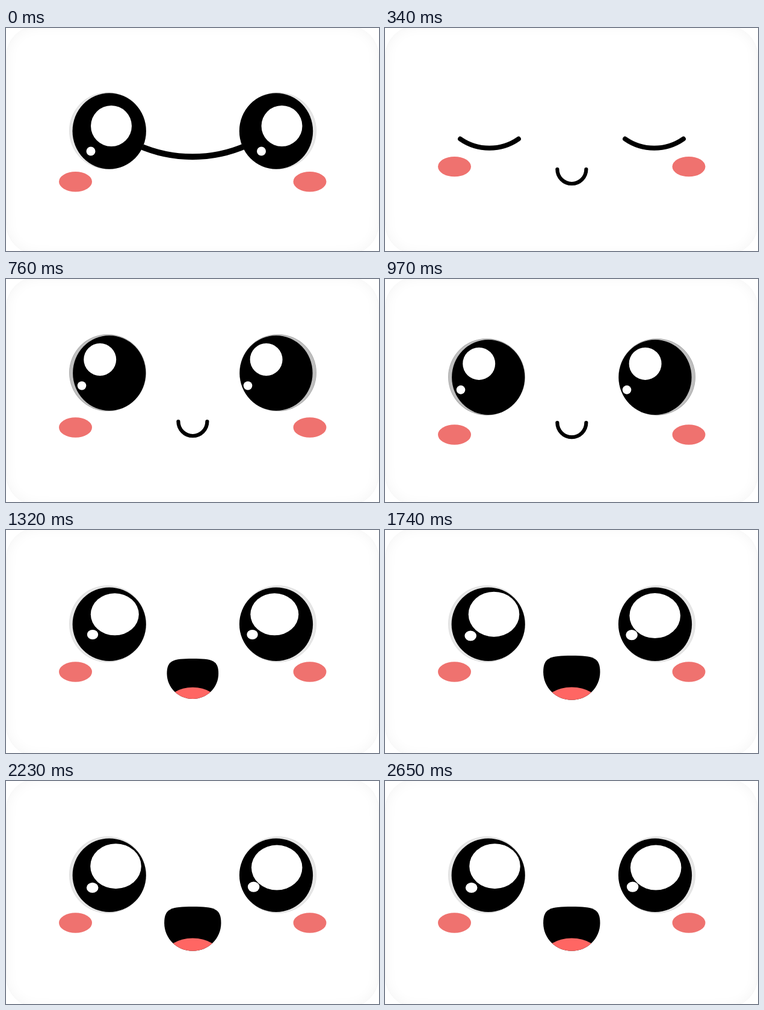
These frames come from a looping animation (620x371 px, 2720 ms). An HTML page with a canvas:

```html
<!DOCTYPE html>
<html lang="en">
<head>
<meta charset="utf-8">
<title>Happy face</title>
<style>
  html, body { margin: 0; width: 100%; height: 100%; overflow: hidden; background: #fff; }
  .stage { position: relative; width: 100%; height: 100%; overflow: hidden; contain: paint; }
  .card {
    position: absolute; left: 0; top: -4px; width: 620px; height: 381px;
    box-sizing: border-box; border: 1px solid #f6f6f6; border-radius: 52px;
    background: #fff; box-shadow: inset 0 0 22px rgba(0, 0, 0, .045);
  }
  canvas { position: absolute; left: 0; top: 0; display: block; }
</style>
</head>
<body>
<div class="stage">
  <div class="card"></div>
  <canvas id="face" width="620" height="371"></canvas>
</div>
<script>
const LOOP = 2720, STEP = 70, OFFSET = 60;
const ctx = document.getElementById('face').getContext('2d');
const LIGHT = ['#e7e7e7', '#dcdcdc'], DARK = ['#bfbfbf', '#a6a6a6'];

// Highlights: [left x, left y, right x, right y, radius x, radius y]
const CALM = { big: [175, 163, 458.5, 163, 34, 34], dot: [141, 205, 424.5, 205, 7.5, 7.5] };
const SIDE = { big: [156.2, 134, 432.6, 134, 27, 27], dot: [126, 177.5, 402, 177.5, 7.3, 7.3] };
const GLAD = { big: [180.8, 140.3, 446.3, 140.3, 40, 35], dot: [144, 174, 409.5, 174, 9.2, 8] };
const JOY = { big: [181, 140.2, 448.7, 142.6, 42.3, 37.5], dot: [142.2, 176, 410.1, 174.6, 9.8, 8.6] };

const lerp = (a, b, p) => a + (b - a) * p;
const mix = (a, b, p) => ({
  big: a.big.map((v, i) => lerp(v, b.big[i], p)),
  dot: a.dot.map((v, i) => lerp(v, b.dot[i], p))
});

function oval(x, y, rx, ry, fill) {
  ctx.fillStyle = fill;
  ctx.beginPath();
  ctx.ellipse(x, y, rx, ry, 0, 0, Math.PI * 2);
  ctx.fill();
}

// Circular arc hanging between two points at height y
function sag(x1, x2, y, depth, width) {
  const half = (x2 - x1) / 2;
  const r = (half * half + depth * depth) / (2 * depth);
  const a = Math.asin(half / r);
  ctx.strokeStyle = '#000';
  ctx.lineWidth = width;
  ctx.lineCap = 'round';
  ctx.beginPath();
  ctx.arc((x1 + x2) / 2, y + depth - r, r, Math.PI / 2 - a, Math.PI / 2 + a);
  ctx.stroke();
}

function glints([lx, ly, rx, ry, w, h], dx, dy) {
  oval(lx + dx, ly + dy, w, h, '#fff');
  oval(rx + dx, ry + dy, w, h, '#fff');
}

function eyes(y, rx, ry, ring, look, dx = 0, dy = 0) {
  for (const [cx, out] of [[171.7, -2.7], [449, 3]]) {
    oval(cx + out, y - 0.5, 64, 64, ring[1]);
    oval(cx + out, y - 0.5, 63.2, 63.2, ring[0]);
    oval(cx, y, rx, ry, '#000');
  }
  glints(look.big, dx, dy);
  glints(look.dot, dx, dy);
}

function closedEyes() {
  sag(125, 222, 184.4, 15.3, 7.9);
  sag(399, 496, 184.4, 15.3, 7.9);
}

function cheeks(y) {
  oval(115.5, y, 27.5, 16.7, '#ef726f');
  oval(505, y, 27.5, 16.7, '#ef726f');
}

function smallMouth(y) {
  ctx.strokeStyle = '#000';
  ctx.lineWidth = 6.2;
  ctx.lineCap = 'round';
  ctx.beginPath();
  ctx.arc(310.4, y, 24, Math.PI, 0, true);
  ctx.stroke();
}

function openMouth(scale) {
  ctx.save();
  ctx.translate(310.3, 263.3);
  ctx.scale(scale, scale);
  ctx.beginPath();
  ctx.moveTo(-47.2, -27);
  ctx.bezierCurveTo(-47.2, -51, -36, -54.3, 0, -54.3);
  ctx.bezierCurveTo(36, -54.3, 47.2, -51, 47.2, -27);
  ctx.bezierCurveTo(47.2, -1, 26, 19.5, 0, 19.5);
  ctx.bezierCurveTo(-26, 19.5, -47.2, -1, -47.2, -27);
  ctx.fillStyle = '#000';
  ctx.fill();
  ctx.clip();
  oval(0, 27.2, 46, 29, '#ff6663');
  ctx.restore();
}

function draw(t) {
  const tick = Math.floor((t - OFFSET) / STEP);
  const since = ms => tick - (ms - OFFSET) / STEP;
  ctx.clearRect(0, 0, 620, 371);

  if (t < 340) {
    cheeks(255.7);
    sag(220, 400, 195.3, 19, 9.9);
    if (t < 200) eyes(171.5, 61.2, 63.2, LIGHT, CALM);
    else eyes(171.5, 60.6, 62.5, LIGHT, SIDE, 0, 15);
  } else if (t < 550) {
    cheeks(230.6);
    closedEyes();
    smallMouth(235);
  } else if (t < 1180) {
    // Drift down, then rest
    const p = Math.min(since(550), 6) - 3;
    cheeks(247 + 4 * p);
    eyes(156.5 + 2.3 * p, 60.6, 62.5, DARK, SIDE, 0, 2.3 * p);
    smallMouth(237 + 0.7 * p);
  } else if (t < 1460) {
    // Mouth pops open while the face lifts
    const p = Math.min((since(1180) + 1) / 3, 1);
    cheeks(lerp(259, 236, p));
    eyes(lerp(163.4, 156.7, p), 61.1, 61.3, LIGHT, mix(SIDE, GLAD, p), 0, lerp(6.9, 0, p));
    openMouth(lerp(0.35, 0.908, p));
  } else {
    // Glints tremble on alternate ticks
    const shake = since(1460) % 2 * 1.5;
    cheeks(236);
    eyes(156.7, 61.1, 61.3, LIGHT, JOY, shake, shake);
    openMouth(1);
  }
}

function frame() {
  draw(performance.now() % LOOP);
  requestAnimationFrame(frame);
}
frame();
</script>
</body>
</html>
```
